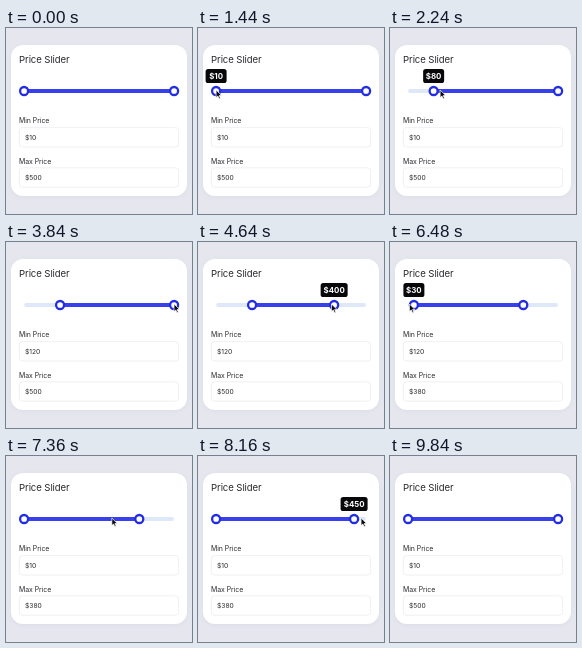
Recreate the animation shown at these times as an HTML page. Size 186x186 px, loop 10 s.

```html
<!DOCTYPE html>
<html lang="en">
<head>
<meta charset="utf-8">
<title>Price Slider</title>
<style>
  html, body { margin: 0; width: 100%; height: 100%; overflow: hidden; background: #e5e6ee; }
  svg { display: block; width: 100vw; height: 100vh; }
  text { font-family: Inter, "Liberation Sans", sans-serif; fill: #2a2a2f; }
  .title { font-size: 9.6px; letter-spacing: -.1px; }
  .label { font-size: 6.9px; letter-spacing: -.03px; }
  .value { font-size: 6.7px; }
  .card { fill: #fff; filter: drop-shadow(0 1px 2px rgba(60, 70, 110, .05)); }
  .field { fill: #fff; stroke: #ebecf0; stroke-width: .8; }
  .rail { stroke: #dfe8f8; }
  .range { stroke: #3840ee; }
  .rail, .range { stroke-width: 3.8; stroke-linecap: round; }
  .thumb { fill: #fff; stroke: #222ce0; stroke-width: 2.3; }
  .tip rect { fill: #08080a; }
  .tip text { fill: #fff; font-size: 7.9px; font-weight: 700; text-anchor: middle; }
  .cursor { fill: #0a0a0c; stroke: #fff; stroke-width: .7; stroke-linejoin: round; }
</style>
</head>
<body>
<svg viewBox="0 0 186 186">
  <rect class="card" x="5" y="17" width="176" height="151" rx="12"/>
  <text class="title" x="13" y="35.3">Price Slider</text>

  <path class="rail" d="M20 63H166"/>
  <path class="range" id="range"/>
  <circle class="thumb" id="minThumb" cy="63" r="4"/>
  <circle class="thumb" id="maxThumb" cy="63" r="4"/>

  <text class="label" x="13" y="95.2">Min Price</text>
  <rect class="field" x="13.4" y="99.6" width="159.2" height="19.4" rx="3"/>
  <text class="value" id="minValue" x="19" y="111.8"></text>

  <text class="label" x="13" y="135.5">Max Price</text>
  <rect class="field" x="13.4" y="139.8" width="159.2" height="19.4" rx="3"/>
  <text class="value" id="maxValue" x="19" y="152"></text>

  <g class="tip" id="tip">
    <rect id="tipBox" y="41" height="14" rx="2.6"/>
    <text id="tipText" y="50.9"></text>
  </g>
  <path class="cursor" id="cursor" d="M0 0V7.6L1.8 6L3 8.8L4.3 8.2L3.1 5.5H5.5Z"/>
</svg>

<script>
const LOOP = 10000;
const PULL = 870;       // length of a drag
const GLIDE = 900;      // longest move between thumbs
const THUMB_LAG = 180;  // thumb trails the pointer
const TIP_LAG = 60;     // tooltip text trails the thumb
const ENTER = 80, EXIT = 8400, GONE = 8800;

const drags = [
  { thumb: 'min', show: 1360, start: 1660, release: 2640, from: 0, to: 120 },
  { thumb: 'max', show: 3880, start: 3840, release: 5040, from: 500, to: 384 },
  { thumb: 'min', show: 5740, start: 5780, release: 6800, from: 120, to: 0 },
  { thumb: 'max', show: 7840, start: 7622, release: GONE, from: 384, to: 500 }
];

const $ = id => document.getElementById(id);
const set = (id, attrs) => Object.entries(attrs).forEach(([k, v]) => $(id).setAttribute(k, v));
const show = (id, on) => set(id, { visibility: on ? 'visible' : 'hidden' });
const mix = (a, b, u) => a + (b - a) * u;
const ramp = (t, start, length) => Math.min(1, Math.max(0, (t - start) / length));
const smooth = u => u * u * (3 - 2 * u);
const pull = (t, start) => 1 - (1 - ramp(t, start, PULL)) ** 2;
const toX = value => 18.1 + value * .3;
const price = value => '$' + Math.max(10, Math.round(value / 10) * 10);

// Value of a thumb, moved by each of its drags in turn.
function thumbValue(name, progress) {
  const own = drags.filter(d => d.thumb === name);
  return own.reduce((value, d) => mix(value, d.to, progress(d)), own[0].from);
}

const dragged = (name, t) => thumbValue(name, d => pull(t - THUMB_LAG, d.start));
const released = (name, t) => thumbValue(name, d => t >= d.release ? 1 : 0);

function drawCursor(t) {
  let x = 85, y = 164, leave = ENTER;
  for (const d of drags) {
    const glide = smooth(ramp(t, leave, Math.min(GLIDE, d.start - leave)));
    x = mix(mix(x, toX(d.from), glide), toX(d.to), pull(t, d.start));
    y = mix(y, 62, glide);
    leave = d.release;
  }
  const exit = ramp(t, EXIT, 240);
  set('cursor', { transform: `translate(${x + 20 * exit} ${y + 6 * exit})` });
  show('cursor', t >= ENTER && t < GONE);
}

function drawTip(t) {
  const drag = drags.find(d => t >= d.show && t < d.release);
  show('tip', drag);
  if (!drag) return;
  const x = toX(dragged(drag.thumb, t));
  const text = price(dragged(drag.thumb, t - TIP_LAG));
  const width = 3 + 6 * text.length;
  set('tipBox', { x: x - width / 2, width });
  set('tipText', { x });
  $('tipText').textContent = text;
}

function draw(t) {
  for (const name of ['min', 'max']) {
    set(name + 'Thumb', { cx: toX(dragged(name, t)) });
    $(name + 'Value').textContent = price(released(name, t));
  }
  set('range', { d: `M${toX(dragged('min', t))} 63H${toX(dragged('max', t))}` });
  drawTip(t);
  drawCursor(t);
}

const begin = performance.now();
function tick() {
  draw((performance.now() - begin) % LOOP);
  requestAnimationFrame(tick);
}
tick();
</script>
</body>
</html>
```
